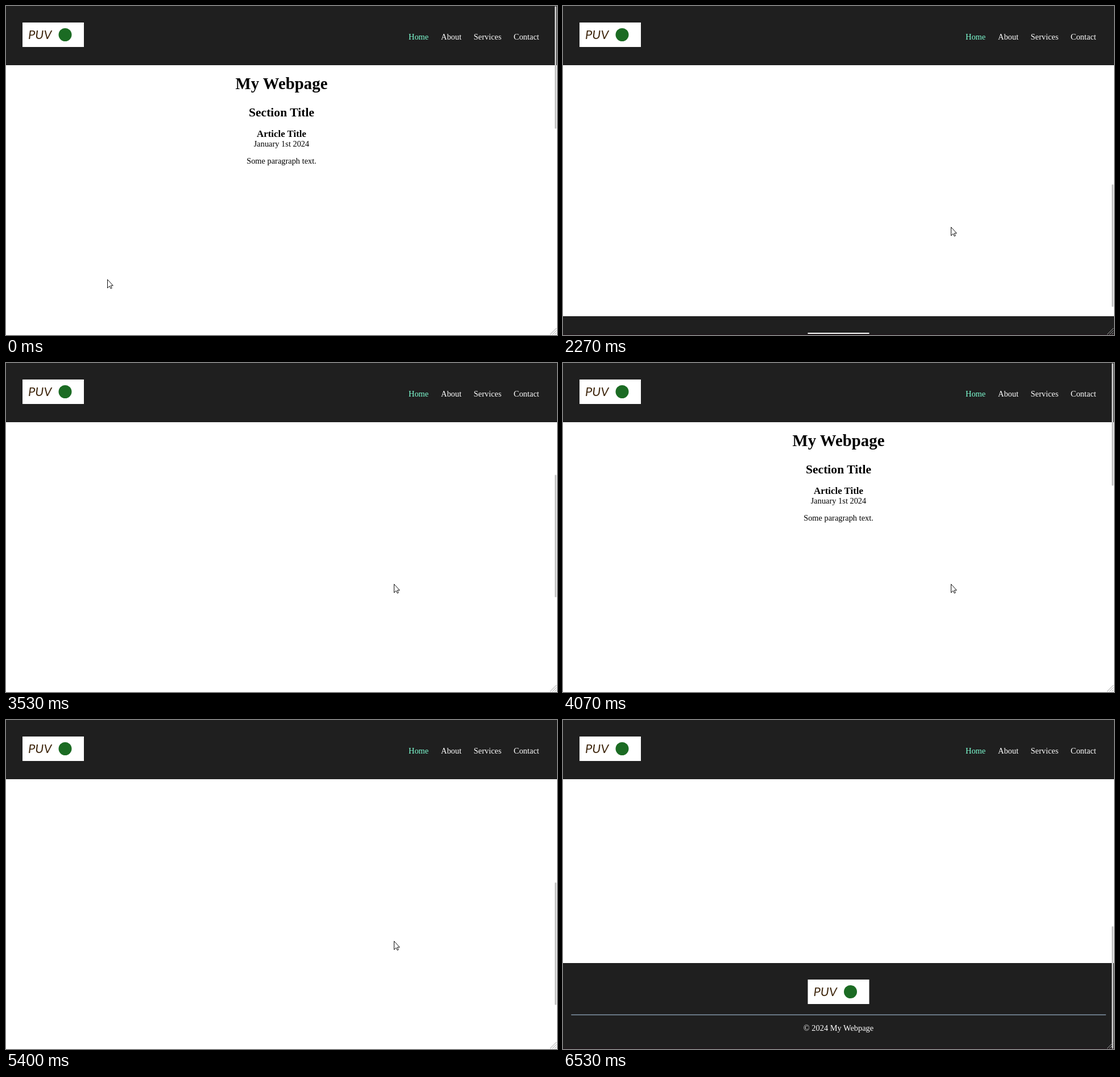
An HTML page for the animation above (7.19 s loop, 969 by 578 pixels).

```html
<!DOCTYPE html>
<html lang="en">
<head>
<meta charset="utf-8">
<title>Sticky header</title>
<style>
  html, body { margin: 0; width: 100%; height: 100%; overflow: hidden; background: #fff; }
  svg { display: block; width: 969px; height: 578px; }
  text { font: 14.4px "Liberation Serif", "Times New Roman", serif; }
  .bar { fill: #1f1f1f; }
  .mid text { text-anchor: middle; }
  .light text { fill: #fff; }
  .light .active { fill: #7fffd4; }
  .h1 { font-size: 28.8px; font-weight: bold; }
  .h2 { font-size: 21.6px; font-weight: bold; }
  .h3 { font-size: 16.85px; font-weight: bold; }
  #logo text { font: italic 22px Lato, sans-serif; fill: #40280f; text-anchor: start; }
  #page { transform: translateY(calc(var(--scroll) * -1px)); }
  #foot { transform: translateY(calc(1303px - var(--scroll) * 1px)); }
  #edge { y: max(576px, calc(1303px - var(--scroll) * 1px)); fill: #20181c; }
  #thumb { transform: translateY(calc(var(--thumb) * 1px)); fill: #c4c4c4; }
  #pointer {
    transform: translate(calc(var(--x) * 1px), calc(var(--y) * 1px));
    opacity: var(--pointer);
  }
</style>
</head>
<body>
<svg id="stage" viewBox="0 0 969 578" style="--scroll:0;--thumb:0;--x:178;--y:480;--pointer:1">
  <defs>
    <g id="logo">
      <rect width="108" height="43" fill="#fff"/>
      <text x="10" y="29">PUV</text>
      <circle cx="75" cy="21.5" r="11.5" fill="#1b6b23"/>
    </g>
  </defs>

  <g id="page" class="mid">
    <text class="h1" x="484.5" y="146">My Webpage</text>
    <text class="h2" x="484.5" y="194">Section Title</text>
    <text class="h3" x="484.5" y="230">Article Title</text>
    <text x="484.5" y="247">January 1st 2024</text>
    <text x="484.5" y="277">Some paragraph text.</text>
  </g>

  <g id="foot" class="light mid">
    <rect class="bar" width="969" height="152"/>
    <use href="#logo" x="430.5" y="29"/>
    <rect x="14.4" y="90" width="940.4" height="1.8" fill="#708090"/>
    <text x="484.5" y="119">© 2024 My Webpage</text>
  </g>
  <rect id="edge" width="969" height="2"/>

  <g class="light">
    <rect class="bar" width="969" height="104"/>
    <use href="#logo" x="29" y="29"/>
    <text class="active" x="708" y="59">Home</text>
    <text x="765" y="59">About</text>
    <text x="822.5" y="59">Services</text>
    <text x="892.8" y="59">Contact</text>
  </g>

  <rect id="thumb" x="965" y=".5" width="3" height="215" rx="1"/>
  <path d="M957 577l11-11M961 577l7-7M965 577l3-3" stroke="#a0a0a0" fill="none"/>
  <path id="pointer" d="M.5 .5V15.5L4 12L6.2 16.5L8.2 15.6L6.2 11.2H10.3Z" fill="#fff" stroke="#111" stroke-linejoin="round"/>
</svg>
<script>
  const LOOP = 7190, TICK = 200 / 3;
  const TRAVEL = 362, PAGE = 876;  // scrollbar and page range in pixels
  const SPEED_UP = 60, SLOW_DOWN = 205;

  // Each scroll runs from start to end and stops at a share of the range.
  const scrolls = [
    { start: 870, end: 1330, to: .31 },
    { start: 1400, end: 1930, to: .72 },
    { start: 2070, end: 2530, to: 1 },
    { start: 3130, end: 4070, to: 0 },
    { start: 4400, end: 5000, to: 1 },
    { start: 5270, end: 5870, to: 0 },
    { start: 6070, end: 6530, to: 1 }
  ];

  const clamp = v => Math.min(1, Math.max(0, v));
  const smooth = v => v * v * (3 - 2 * v);

  // Share of a scroll done: quick start, steady speed, longer stop.
  function glide(t, length) {
    if (t <= 0) return 0;
    if (t >= length) return 1;
    const left = length - t, steady = length - (SPEED_UP + SLOW_DOWN) / 2;
    if (t < SPEED_UP) return t * t / (2 * SPEED_UP) / steady;
    if (left < SLOW_DOWN) return 1 - left * left / (2 * SLOW_DOWN) / steady;
    return (t - SPEED_UP / 2) / steady;
  }

  const position = t => scrolls.reduce(
    (p, { start, end, to }) => p + (to - p) * glide(t - start, end - start), 0);

  // The screen refreshes 15 times a second, on 10 ms marks.
  const hold = t => Math.round(Math.floor((t + 5) / TICK) * TICK / 10) * 10;

  const style = document.getElementById("stage").style;
  const set = (name, v) => style.setProperty("--" + name, v);

  function draw(t) {
    const p = position(t);
    const nudge = clamp(t / 130), sweep = smooth(clamp((t - 270) / 600));
    set("thumb", Math.round(p * TRAVEL));
    set("scroll", Math.round(p * PAGE));
    set("x", Math.round(178 + 35 * nudge + 469 * sweep));
    set("y", Math.round(480 - 37 * nudge - 55 * sweep));
    set("pointer", t < 6530 ? 1 : 0);
  }

  const start = performance.now();
  function frame() {
    draw(hold((performance.now() - start) % LOOP));
    requestAnimationFrame(frame);
  }
  frame();
</script>
</body>
</html>
```
